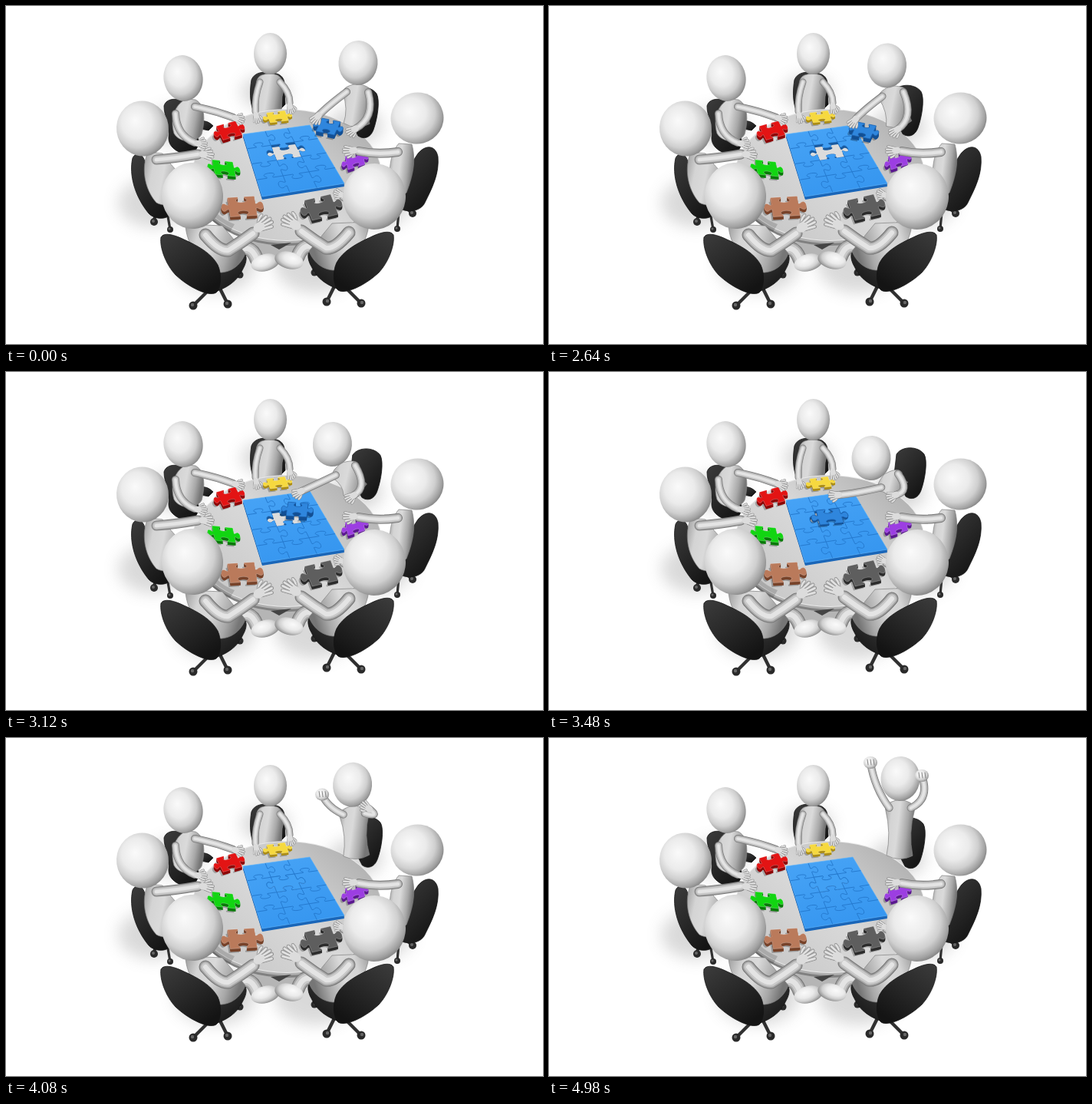
Write an HTML page that moves like this. It is 700 px wide and 440 px high and loops after 7.98 s.

```html
<!DOCTYPE html>
<html lang="en">
<head>
<meta charset="utf-8">
<title>Round table puzzle</title>
<style>
html, body { margin: 0; width: 100%; height: 100%; overflow: hidden; background: #fff; }
svg { display: block; width: 700px; height: 440px; }
</style>
</head>
<body>
<svg viewBox="0 0 700 440">
  <defs>
    <radialGradient id="ball" cx=".43" cy=".41" r=".64" fx=".38" fy=".34">
      <stop offset="0" stop-color="#fafafa"/><stop offset=".45" stop-color="#ebebeb"/>
      <stop offset=".7" stop-color="#cfcfcf"/><stop offset=".88" stop-color="#a2a2a2"/>
      <stop offset="1" stop-color="#777"/>
    </radialGradient>
    <linearGradient id="skin" x2="1" y2=".25">
      <stop offset="0" stop-color="#9c9c9c"/><stop offset=".25" stop-color="#d4d4d4"/>
      <stop offset=".5" stop-color="#dadada"/><stop offset=".8" stop-color="#a8a8a8"/>
      <stop offset="1" stop-color="#767676"/>
    </linearGradient>
    <linearGradient id="seat" x2=".7" y2="1">
      <stop offset="0" stop-color="#3c3c3c"/><stop offset=".5" stop-color="#292929"/>
      <stop offset="1" stop-color="#141414"/>
    </linearGradient>
    <linearGradient id="top" x1=".1" y1=".8" x2=".9" y2=".2">
      <stop offset="0" stop-color="#c9c9c9"/><stop offset=".5" stop-color="#d9d9d9"/>
      <stop offset="1" stop-color="#b4b4b4"/>
    </linearGradient>
    <linearGradient id="blue" x2=".4" y2="1">
      <stop offset="0" stop-color="#48a4f6"/><stop offset="1" stop-color="#3797f0"/>
    </linearGradient>
    <filter id="soft" x="-50%" y="-50%" width="200%" height="200%"><feGaussianBlur stdDeviation="10"/></filter>
  </defs>
  <g id="back"></g>
  <g id="mover"></g>
  <g id="front"></g>
</svg>
<script>
const $ = id => document.getElementById(id);
const mix = (a, b, k) => a + (b - a) * k;
const mixAll = (a, b, k) => a.map((v, i) => mix(v, b[i], k));
const clamp = k => Math.max(0, Math.min(1, k));
const n1 = v => v.toFixed(1);

// --- drawing helpers ---
const ell = (x, y, rx, ry, fill, rot = 0) =>
  `<ellipse cx="${n1(x)}" cy="${n1(y)}" rx="${rx}" ry="${ry}" fill="${fill}" transform="rotate(${rot} ${n1(x)} ${n1(y)})"/>`;
const shape = (d, fill, more = '') => `<path d="${d}" fill="${fill}" ${more}/>`;
const line = (d, w, color) =>
  `<path d="${d}" fill="none" stroke="${color}" stroke-width="${n1(w)}" stroke-linecap="round" stroke-linejoin="round"/>`;
const limb = (d, w) => [['#7c7c7c', 1], ['#a8a8a8', .86], ['#c9c9c9', .66], ['#e4e4e4', .36]]
  .map(([c, k]) => line(d, w * k, c)).join('');
const head = (x, y, rx, ry, rot = 0) => ell(x, y, rx, ry, 'url(#ball)', rot);
const body = d => shape(d, 'url(#skin)', 'stroke="#808080" stroke-width=".7"');
const chair = d => shape(d, 'url(#seat)', 'stroke="#151515" stroke-width=".8"');
const foot = (x0, y0, x, y, r) => line(`M${x0} ${y0}L${x} ${y}`, r * .8, '#303030') +
  ell(x, y, r, r, '#2a2a2a') + ell(x - 1, y - 1, r * .4, r * .4, '#666');

function hand(x, y, deg, s = 1) {
  let fingers = '';
  for (let f = -1.5; f < 2; f++) fingers += limb(`M0 ${f * 1.7}Q5 ${f * 2.5} ${12 - f * f} ${f * 3.3}`, 3.2);
  return `<g transform="translate(${n1(x)} ${n1(y)}) rotate(${n1(deg)}) scale(${s})">` +
    limb('M1 -3Q3 -7 7 -8', 3) + fingers + ell(0, 0, 5.2, 4.2, '#dcdcdc') + '</g>';
}
const fist = (x, y) => head(x, y, 9, 8) +
  [-4, 0, 4].map(o => line(`M${n1(x + o)} ${n1(y - 4)}l1 7`, .9, '#777')).join('');

// --- jigsaw geometry ---
const TAB = [[.38, 0], [.42, -.08], [.3, -.1], [.3, -.18], [.3, -.32], [.7, -.32], [.7, -.18], [.7, -.1], [.58, -.08], [.62, 0], [1, 0]];
function edge(map, [ax, ay], [bx, by], s) {
  const dx = bx - ax, dy = by - ay;
  const p = TAB.map(([x, y]) => map(ax + dx * x - dy * y * s, ay + dy * x + dx * y * s).map(n1).join(' '));
  return `L${p[0]}C${p.slice(1, 4)}C${p.slice(4, 7)}C${p.slice(7, 10)}L${p[10]}`;
}
const start = (map, x, y) => 'M' + map(x, y).map(n1).join(' ');
function jigsaw(map) {
  const c = [[-.5, -.5], [.5, -.5], [.5, .5], [-.5, .5]];
  return start(map, -.5, -.5) + c.map((p, i) => edge(map, p, c[(i + 1) % 4], i % 2 ? 1 : -1)).join('') + 'Z';
}
const flat = (cx, cy, ux, uy, vx, vy) => (x, y) => [cx + ux * x + vx * y, cy + uy * x + vy * y];
function piece(map, fill, dark, h = 4, rim = 'rgba(255,255,255,.3)') {
  const d = jigsaw(map);
  let s = h > .2 ? shape(d, 'rgba(0,0,0,.25)', `transform="translate(-2 ${n1(h + 1.5)})"`) : '';
  for (let y = h; y > 0; y--) s += shape(d, dark, `transform="translate(0 ${n1(y)})"`);
  return s + shape(d, fill, `stroke="${rim}" stroke-width=".8"`);
}

const COLS = 3, ROWS = 4;
function board(c, r) {
  const u = c / COLS, w = r / ROWS, v = w * (.9 + .1 * w);
  return [mix(309 + 25 * v, 396 + 45 * v, u), mix(167 + 81 * v, 155 + 76 * v, u)];
}
const slot = (x, y) => board(1.5 + x, 1.5 + y);

function boardArt() {
  const corners = [[0, 0], [COLS, 0], [COLS, ROWS], [0, ROWS]].map(p => board(...p).map(n1).join(' '));
  const quad = `M${corners.join('L')}Z`;
  let seams = '', s = '';
  for (let r = 0; r < ROWS; r++) for (let c = 0; c < COLS; c++) {
    const sign = (c + r) % 2 ? -1 : 1;
    if (c < COLS - 1) seams += start(board, c + 1, r) + edge(board, [c + 1, r], [c + 1, r + 1], sign);
    if (r < ROWS - 1) seams += start(board, c, r + 1) + edge(board, [c, r + 1], [c + 1, r + 1], sign);
  }
  const hole = jigsaw(slot);
  for (let y = 4; y > 0; y--) s += shape(quad, '#1a66b8', `transform="translate(0 ${y})"`);
  return s + shape(quad, 'url(#blue)', 'stroke="#5cb2fa" stroke-width=".7"') +
    `<path d="${seams}" fill="none" stroke="#2377cb" stroke-width=".9"/>` +
    `<clipPath id="gap"><path d="${hole}"/></clipPath><g clip-path="url(#gap)">` +
    shape(hole, '#195a9f') + shape(hole, '#dcdcdc', 'transform="translate(1 3)"') + '</g>';
}

// --- still scenery ---
function shadows() {
  let s = '';
  for (let i = 0; i < 7; i++) {
    const a = Math.PI * (.5 + (i + .5) / 3.5), near = .5 + Math.sin(a) / 2;
    s += ell(338 + 150 * Math.cos(a), 230 + 118 * Math.sin(a), 32 + 22 * near, 22 + 16 * near, '#777');
  }
  return `<g filter="url(#soft)" opacity=".27">${s}</g>`;
}

const farSeats =
  chair('M320 96C324 86 336 85 345 87C356 87 363 92 363 102L364 128L352 140L323 138C317 124 318 108 320 96Z') +
  body('M333 90C324 94 325 106 329 118L329 140L359 140L360 118C364 104 361 94 354 90Q344 86 333 90Z') +
  chair('M206 130C209 120 222 119 236 125L252 178L244 195C226 193 212 185 212 172C214 156 206 144 206 130Z') +
  chair('M253 150Q262 148 270 156L264 162L254 160Z') +
  body('M236 121C221 126 213 146 219 166C226 178 247 180 255 167C260 148 259 128 247 122Z');

const table =
  shape('M312 296L400 296L398 324Q356 330 318 322Z', '#b5b5b5') +
  ell(366, 226, 124, 86, '#808080') + ell(366, 223, 124, 86, '#b0b0b0') +
  ell(366, 220, 124, 86, '#eaeaea') + ell(366, 220, 123, 85, 'url(#top)') +
  shape('M345 311L372 308L356 317Z', '#444') +
  shape('M258 265Q268 284 292 294L298 284Q276 276 266 258Z', '#000', 'opacity=".16"');

const loose =
  piece(flat(291, 162, 25, -7, 9, 18), '#e31414', '#8e0505') +
  piece(flat(354, 144, 24, -3, 5, 13), '#f6d93f', '#ad8d10', 3) +
  piece(flat(455, 201, 22, -7, 4, 17), '#9c3ee2', '#5a1790') +
  piece(flat(284, 211, 27, 3, 4, 19), '#12d512', '#087a08') +
  piece(flat(308, 261, 35, -2, 4, 25), '#ba7a5b', '#774229') +
  piece(flat(411, 262, 34, -8, 10, 26), '#5e5e5e', '#2c2c2c');

const farPeople =
  limb('M331 99Q324 118 325 137', 9) + hand(326, 142, 80, .85) +
  limb('M357 99Q370 112 370 126', 9) + hand(370, 130, 75, .85) + head(344.5, 62, 21.5, 27) +
  limb('M246 131Q272 136 296 145', 10) + hand(299, 146, 18, .95) +
  limb('M221 140Q222 168 246 178', 10) + hand(250, 179, 5, .95) + head(231, 94, 25.5, 30, -10);

const leftPerson =
  foot(196, 262, 193, 281, 5) + foot(210, 268, 214, 291, 4) +
  chair('M165 198C169 189 179 192 181 203C185 228 200 252 218 266C214 279 194 279 186 270C168 248 160 220 165 198Z') +
  body('M185 190C176 210 180 238 196 256C214 266 235 250 238 232L214 205L204 192Z') +
  limb('M196 200Q222 198 250 193', 13) + hand(257, 193, 8, 1.1) + head(178, 159.5, 34, 36, -8);

const rightPerson =
  foot(520, 262, 530, 270, 5) + foot(512, 268, 510, 290, 4) +
  chair('M563 196C560 181 547 180 537 192C525 208 521 230 519 248L508 258C514 270 540 270 546 256C556 236 565 218 563 196Z') +
  body('M512 179C500 192 498 218 502 240Q512 252 522 243C530 222 535 202 529 180Z') +
  limb('M511 190Q484 194 460 189', 12) + hand(453, 188, 178, 1.1) +
  limb('M500 238Q470 262 440 248', 12) + hand(438, 246, 200, .9) + head(536, 146, 34.5, 33.5, -14);

// The two nearest players share one drawing, mirrored for the right one.
const nearSeat =
  limb('M300 322Q318 306 327 330', 19) + head(338, 334, 19, 11, -14) +
  foot(285, 345, 305, 350, 4.5) + foot(266, 368, 244, 390, 5.5) + foot(276, 362, 289, 388, 5.5) +
  chair('M268 346L304 323C314 318 316 330 309 342C302 358 288 368 266 374Z') +
  body('M234 284C234 304 248 332 276 347C292 348 306 338 312 322L282 286Z') +
  limb('M260 298Q278 320 290 318Q306 308 322 296', 17) + hand(330, 288, -30, 1.5) +
  chair('M202 301C206 294 220 298 232 304C250 312 268 322 276 337C282 350 280 368 274 373C264 379 238 366 221 350C208 336 200 314 202 301Z');
const nearPeople = nearSeat + head(243, 247, 40, 43, -4) +
  `<g transform="matrix(-1 0 0 1 707 -3)">${nearSeat}</g>` + head(480, 248, 41, 43, 5);

$('back').innerHTML = shadows() + farSeats + table + boardArt() + loose + farPeople;
$('front').innerHTML = leftPerson + rightPerson + nearPeople;

// --- the standing player: head, left hand, right hand ---
const rest = [459, 74, 407, 143, 455, 160];
const grab = [452, 73, 409, 143, 455, 160];
const carry = [429, 82, 390, 152, 454, 161];
const place = [420, 112, 377, 160, 452, 160];
const rise = [445, 69, 405, 117, 460, 137];
const pump = [458, 53, 413, 46, 491, 62];
const cheer = [458, 53, 419, 32, 486, 49];
const MOVES = [[0, rest], [2280, rest], [2400, grab], [2880, carry], [3480, place], [3840, rise],
  [4310, cheer], [4460, pump], [4720, cheer], [4830, pump], [4980, cheer]];
const CARRY = [[0, [420, 157]], [2400, [423, 157]], [2880, [398, 167]], [3480, [371, 185]], [3600, slot(0, 0)]];
const SEAT = [[0, [-4, 6]], [2400, [-4, 6]], [2880, [0, 1]], [3480, [2, -1]], [4310, [1, 4]]];
const HIP = [457, 157], LOOP = 7980;

function track(keys, t) {
  const i = keys.findIndex(k => k[0] > t);
  if (i < 0) return keys[keys.length - 1][1];
  const [t0, a] = keys[i - 1], [t1, b] = keys[i];
  return mixAll(a, b, (t - t0) / (t1 - t0));
}

// Poses hold between steps: even beats first, then alternating short and long ones.
function held(t) {
  if (t < 2400) return 0;
  if (t < 4200) return t - t % 120;
  let i = 6;
  const beat = j => 4200 + 130 * j - j % 2 * 20;
  while (beat(i) > t) i--;
  return beat(i);
}

function player(t) {
  const [hx, hy, lx, ly, rx, ry] = track(MOVES, t);
  const far = Math.hypot(HIP[0] - hx, HIP[1] - hy), dx = (HIP[0] - hx) / far, dy = (HIP[1] - hy) / far;
  const at = (along, side) => [hx + dx * along - dy * side, hy + dy * along + dx * side];
  const pt = (along, side) => at(along, side).map(n1).join(' ');
  const waist = mix(38, far, .5);
  const flank = s => `${pt(29, 8 * s)} ${pt(31, 19 * s)} ${pt(40, 19 * s)}`;
  const torso = `M${pt(27, 0)}C${flank(1)}Q${pt(waist, 11)} ${pt(far - 4, 17)}Q${pt(far + 5, 0)} ${pt(far - 4, -17)}` +
    `Q${pt(waist, -11)} ${pt(40, -19)}C${pt(31, -19)} ${pt(29, -8)} ${pt(27, 0)}Z`;

  const reach = (side, x, y, bow) => {
    const [sx, sy] = at(38, side), ex = (sx + x) / 2 + bow, ey = (sy + y) / 2 + Math.abs(bow) / 2;
    const deg = Math.atan2(y - ey, x - ex) * 180 / Math.PI;
    return limb(`M${n1(sx)} ${n1(sy)}Q${n1(ex)} ${n1(ey)} ${n1(x)} ${n1(y)}`, 10) +
      (y < 90 ? fist(x, y) : hand(x, y, deg));
  };

  const seat = `<g transform="translate(${track(SEAT, t).map(n1)})">` +
    chair('M451 108C458 97 479 97 487 108C492 117 488 141 483 155C479 166 470 168 463 163L448 134Z') + '</g>';

  const k = clamp((t - 2880) / 720), free = flat(...track(CARRY, t), 24, 5, -8, 17);
  const map = (x, y) => mixAll(free(x, y), slot(x, y), k);
  const loosePiece = k < 1;
  const lift = loosePiece ? Math.min(5, (3600 - t) / 60) : 0;
  const blue = piece(map, loosePiece ? '#2f86dd' : '#41a0f4', '#124f94', lift, loosePiece ? '#1c64b2' : '#2377cb');

  const skull = head(hx, hy, 25.5, 29, 4);
  const arms = reach(-14, rx, ry, 18) + reach(14, lx, ly, -7);
  const bent = ly > hy + 40 && t > 0;
  return seat + blue + body(torso) + (bent ? arms + skull : skull + arms);
}

const begin = performance.now();
let shown = -1;
function frame() {
  const step = held((performance.now() - begin) % LOOP);
  if (step !== shown) $('mover').innerHTML = player(shown = step);
  requestAnimationFrame(frame);
}
frame();
</script>
</body>
</html>
```
